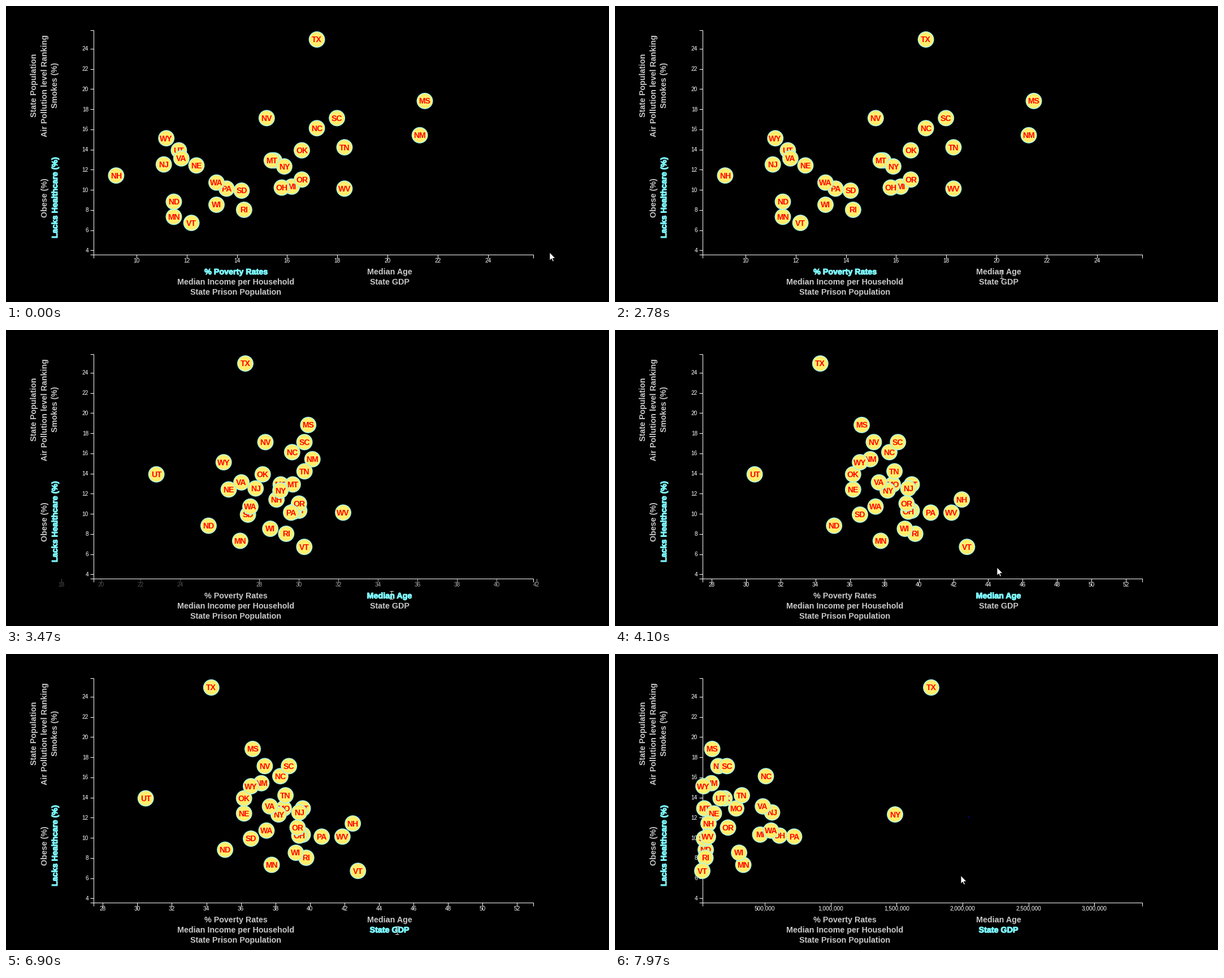
Write a matplotlib script that moves like this. It is 1067 px wide and 525 px high and loops after 8000 ms.

```python
import numpy as np
import matplotlib.pyplot as plt
from matplotlib.animation import FuncAnimation
from matplotlib.patches import Circle, FancyBboxPatch, Polygon
from matplotlib.patheffects import withStroke

W, H, DPI = 1067, 525, 100
LOOP, INTERVAL = 8000, 40
PX = 72 / DPI
LEFT, RIGHT, TOP, BOTTOM = 154, 932, 42, 440
CYAN, GREY, RED, YELLOW = "#7df9ff", "#c8c8c8", "#ff0000", "#ffee6c"
RIM, PINK, BLUE = "#a4f6ee", "#ff77e1", "#0000ff"

# state, poverty %, median age, GDP in thousands, lacks healthcare %
STATES = [
    ("MI", 16.2, 39.6, 468, 10.3), ("MN", 11.5, 37.8, 340, 7.3),
    ("MS", 21.5, 36.7, 104, 18.8), ("MO", 15.5, 38.5, 286, 12.9),
    ("MT", 15.4, 39.6, 44, 12.9), ("NE", 12.4, 36.2, 117, 12.4),
    ("NV", 15.2, 37.4, 151, 17.1), ("NH", 9.2, 42.5, 76, 11.4),
    ("NJ", 11.1, 39.4, 558, 12.5), ("NM", 21.3, 37.2, 98, 15.4),
    ("NY", 15.9, 38.2, 1490, 12.3), ("NC", 17.2, 38.3, 511, 16.1),
    ("ND", 11.5, 35.1, 55, 8.8), ("OH", 15.8, 39.4, 614, 10.2),
    ("OK", 16.6, 36.2, 198, 13.9), ("OR", 16.6, 39.3, 224, 11.0),
    ("PA", 13.6, 40.7, 725, 10.1), ("RI", 14.3, 39.8, 53, 8.0),
    ("SC", 18.0, 38.8, 215, 17.1), ("SD", 14.2, 36.6, 42, 9.9),
    ("TN", 18.3, 38.6, 329, 14.2), ("TX", 17.2, 34.3, 1764, 24.9),
    ("UT", 11.7, 30.5, 168, 13.9), ("VT", 12.2, 42.8, 29, 6.7),
    ("VA", 11.8, 37.7, 488, 13.1), ("WA", 13.2, 37.5, 550, 10.7),
    ("WV", 18.3, 41.9, 72, 10.1), ("WI", 13.2, 39.2, 308, 8.5),
    ("WY", 11.2, 36.6, 38, 15.1),
]
DOMAINS = [(8.28, 25.8), (27.45, 52.92), (27, 3360)]
TICKS = [range(10, 25, 2), range(28, 53, 2), range(500, 3001, 500)]
CLICKS = [2836, 6863]
EASE_MS = 1000

BURSTS = [(0, 0, 1), (70, 840, 11), (920, 990, 2), (1920, 2720, 11),
          (2780, 3560, 11), (3640, 3870, 4), (4100, 4880, 11),
          (5660, 6430, 11), (6510, 7280, 11), (7360, 7970, 9)]
STEPS = np.concatenate([np.linspace(*b) for b in BURSTS])

# Pointer path: ms, x, y
PATH = np.array([
    (0, 962, 437), (840, 615, 335), (920, 606, 329), (1850, 606, 329),
    (1920, 612, 334), (2400, 708, 440), (2720, 684, 481), (2860, 681, 470),
    (3870, 681, 470), (4100, 676, 421), (4400, 688, 360), (4800, 618, 304),
    (5600, 618, 304), (5660, 635, 291), (5950, 800, 380), (6430, 725, 465),
    (6590, 691, 493), (6660, 691, 490), (7290, 691, 490), (7650, 650, 440),
    (7970, 612, 393)])
ARROW = np.array([(0, 0), (0, 14.5), (3.3, 11.4), (5.4, 16.3), (7.5, 15.4),
                  (5.5, 10.6), (10, 10.4)])

plt.rcParams["font.family"] = "Liberation Sans"
fig = plt.figure(figsize=(W / DPI, H / DPI), dpi=DPI, facecolor="black")
ax = fig.add_axes([0, 0, 1, 1])
ax.set(xlim=(0, W), ylim=(H, 0))
ax.axis("off")


def scale_x(value, axis):
    low, high = DOMAINS[axis]
    return LEFT + (value - low) / (high - low) * (RIGHT - LEFT)


def scale_y(value):
    return 432.9 - (value - 4) * 17.87


def write(x, y, text, size, color, weight="bold", z=1, ha="center", rot=0):
    return ax.text(x, y, text, fontsize=size * PX, color=color, weight=weight,
                   zorder=z, ha=ha, va="baseline", rotation=rot,
                   rotation_mode="anchor")


def stroke(xs, ys, color="white", z=1, width=1):
    return ax.plot(xs, ys, color=color, lw=width * PX, zorder=z,
                   solid_capstyle="butt", solid_joinstyle="miter")[0]


def highlight(label, on):
    color = CYAN if on else GREY
    label.set_color(color)
    label.set_path_effects(
        [withStroke(linewidth=1.1 * PX, foreground=color)] if on else [])


def build_axes():
    left, right, top, bottom = (v + 0.5 for v in (LEFT, RIGHT, TOP, BOTTOM))
    stroke([left, left, right, right], [bottom + 6, bottom, bottom, bottom + 6])
    stroke([left - 6, left, left, left - 6], [top, top, bottom, bottom])
    for value in range(4, 25, 2):
        y = scale_y(value) + 0.5
        stroke([left - 6, left], [y, y])
        write(left - 8.5, y + 3.5, str(value), 10, "white", "normal", ha="right")


def build_labels():
    for x, y, text in [(54, 141, "State Population"),
                       (73, 141, "Air Pollution level Ranking"),
                       (91, 141, "Smokes (%)"), (72.5, 340.5, "Obese (%)")]:
        write(x, y, text, 14.3, GREY, rot=90)
    highlight(write(91, 340, "Lacks Healthcare (%)", 14.3, CYAN, rot=90), True)
    for y, text in [(494, "Median Income per Household"),
                    (512, "State Prison Population")]:
        write(407, y, text, 14.3, GREY)
    return [write(407, 476, "% Poverty Rates", 14.3, GREY),
            write(678.5, 476, "Median Age", 14.3, GREY),
            write(678.5, 494, "State GDP", 14.3, GREY)]


def build_ticks(axis):
    made = []
    for value in TICKS[axis]:
        name = f"{value * 1000:,}" if axis == 2 else str(value)
        made.append((value, stroke([0, 0], [BOTTOM + 0.5, BOTTOM + 6.5]),
                     write(0, 454.7, name, 10, "white", "normal")))
    return made


def build_bubbles():
    made = []
    for i, (name, *xs, health) in enumerate(STATES):
        y, z = scale_y(health), 5 + i / 10
        disc = Circle((0, y), 13.7, fc=YELLOW, ec=RIM, lw=1.5 * PX, zorder=z)
        ax.add_patch(disc)
        text = write(0, y + 5, name, 14, RED, z=z + 0.05)
        ends = [scale_x(v, axis) for axis, v in enumerate(xs)]
        made.append((disc, text, ends))
    return made


def build_tooltip(left, right, top, name, measure, value, health):
    mid = (left + right) / 2
    box = FancyBboxPatch((left, top), right - left, 169, fc=PINK, ec="none",
                         boxstyle="round,pad=0,rounding_size=4", zorder=20)
    ax.add_patch(box)
    parts = [box, stroke([left + 6, right - 6], [top + 41.5] * 2, "#ee6cd6", 21)]
    rows = [(21, name, 15.3, BLUE), (72.5, measure, 15.3, BLUE),
            (103, value, 13, "white"), (126, "Healthcare", 15.3, BLUE),
            (156.5, health, 13, "white")]
    for dy, text, size, color in rows:
        parts.append(write(mid, top + dy, text, size, color, z=21))
    return parts


build_axes()
x_labels = build_labels()
tick_sets = [build_ticks(axis) for axis in range(3)]
bubbles = build_bubbles()
tooltips = [
    (920, 1990, build_tooltip(467, 575.7, 232, "West Virginia", "Poverty",
                              "18.3", "10.1")),
    (4790, 5650, build_tooltip(473, 590.5, 208, "New Hampshire", "Age",
                               "42.5", "11.4")),
]
speck = stroke([627, 624.5, 624.5], [286.5, 286.5, 291], "#0000b0")
arrow = Polygon(ARROW, fc="white", ec="black", lw=0.8 * PX, zorder=30)
ax.add_patch(arrow)
beam = stroke([], [], "#dddddd", 30)


def ease_cubic(t):
    t = min(max(t, 0), 1)
    return 4 * t ** 3 if t < 0.5 else 1 - (2 - 2 * t) ** 3 / 2


def move_pointer(t):
    x, y = (np.interp(t, PATH[:, 0], PATH[:, k]) for k in (1, 2))
    over_text = 2650 < t < 3900 or 6500 < t < 7400
    arrow.set_visible(not over_text)
    beam.set_visible(over_text)
    arrow.set_xy(ARROW + (x, y))
    x, y = round(x) + 0.5, round(y)
    beam.set_data([x - 3, x + 3, x, x, x - 3, x + 3],
                  [y - 7, y - 7, y - 7, y + 7, y + 7, y + 7])


def update(frame):
    now = frame * INTERVAL + INTERVAL / 2
    t = STEPS[STEPS <= now].max()
    active = sum(t >= click for click in CLICKS)
    old = max(active - 1, 0)
    new = old + 1
    e = ease_cubic((t - CLICKS[old]) / EASE_MS)

    for i, label in enumerate(x_labels):
        highlight(label, i == active)
    for axis, ticks in enumerate(tick_sets):
        alpha = {old: 1 - e, new: e}.get(axis, 0)
        for value, line, text in ticks:
            x = (1 - e) * scale_x(value, old) + e * scale_x(value, new) + 0.5
            shown = alpha > 0.01 and 41 < x < 996
            for part in (line, text):
                part.set_visible(shown)
                part.set_alpha(alpha)
            line.set_xdata([x, x])
            text.set_x(x)
    for disc, text, ends in bubbles:
        x = (1 - e) * ends[old] + e * ends[new]
        disc.center = x, disc.center[1]
        text.set_x(x)
    for start, end, parts in tooltips:
        for part in parts:
            part.set_visible(start <= t < end)
    speck.set_visible(t >= 5660)
    move_pointer(t)
    return []


anim = FuncAnimation(fig, update, frames=LOOP // INTERVAL, interval=INTERVAL,
                     init_func=lambda: update(0), repeat=True, repeat_delay=0)
plt.show()
```
